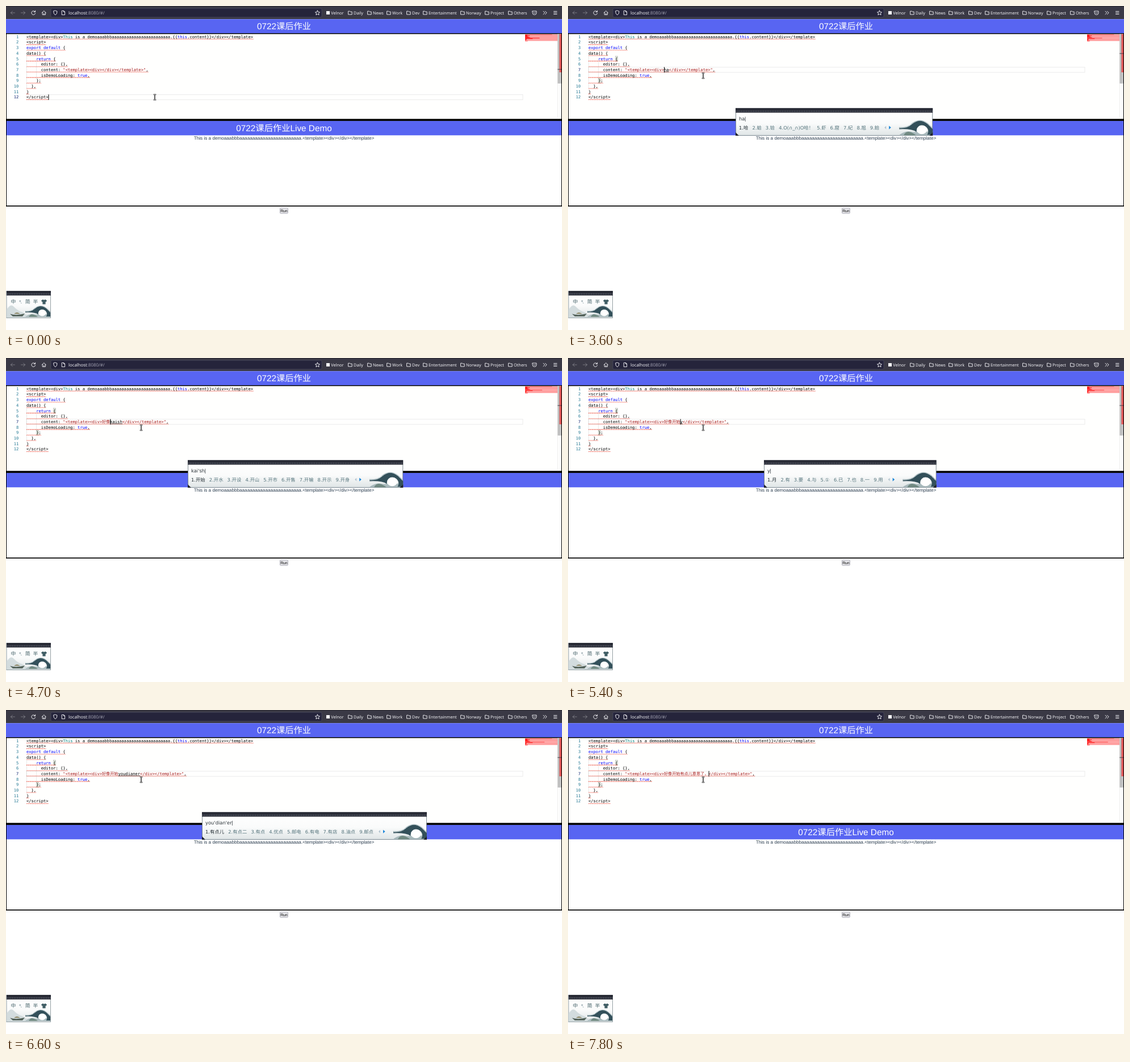
Write an HTML page that moves like this. It is 979x572 px and loops after 8000 ms.

```html
<!DOCTYPE html>
<html lang="zh-CN">
<head>
<meta charset="utf-8">
<title>Live Demo</title>
<style>
html, body { margin: 0; width: 100%; height: 100%; overflow: hidden; background: #fff; }
svg { display: block; width: 979px; height: 572px; }
text { white-space: pre; text-rendering: geometricPrecision; }
.code { font: 7.139px "DejaVu Sans Mono", "Noto Sans CJK SC", monospace; }
.ui { font: 7.4px "Open Sans", "Noto Sans", sans-serif; fill: #fbfbfe; }
.page { font-family: "Liberation Sans", "Noto Sans CJK SC", sans-serif; text-anchor: middle; }
.ime { font: 8.4px "DejaVu Sans", "Noto Sans CJK SC", sans-serif; fill: #55747c; }
.icon { fill: none; stroke: #fbfbfe; stroke-width: .9; stroke-linejoin: round; stroke-linecap: round; }
.k { fill: #00f; } .s { fill: #a31515; } .t { fill: #008080; }
</style>
</head>
<body>
<svg id="stage" viewBox="0 0 979 572" xmlns="http://www.w3.org/2000/svg">
  <defs>
    <pattern id="wave" width="6" height="3" patternUnits="userSpaceOnUse" patternTransform="translate(36 0) scale(.5099)">
      <path fill="#e51400" d="M5.5 0L2.5 3H1.1L4.1 0ZM4 0L6 2V.6L5.4 0ZM0 2L1 3H2.4L0 .6Z"/>
    </pattern>
    <pattern id="tiles" width="3" height="8" patternUnits="userSpaceOnUse">
      <rect width="3" height="8" fill="#20222c"/>
      <path d="M0 2.2H3" stroke="#454955" stroke-width=".6"/>
      <circle cx="1.5" cy="5.6" r="1" fill="#747b88"/>
    </pattern>
    <linearGradient id="mist" x2="0" y2="1">
      <stop offset="0" stop-color="#fff"/><stop offset=".55" stop-color="#fafbfb"/><stop offset="1" stop-color="#dfe5e6"/>
    </linearGradient>
    <symbol id="bridge" viewBox="0 0 60 26" overflow="visible">
      <path d="M2 24Q12 17 24 20L60 19V26H0Z" fill="#a9babd"/>
      <path d="M0 13Q15 14 23 6Q37 -6 51 6L60 15V25H50A10.5 10.5 0 1 0 31 20Q23 14 0 15Z" fill="#33505a"/>
      <path d="M0 12Q15 13 23 5Q37 -6 51 5L60 14" fill="none" stroke="#78949b" stroke-width="1.6" stroke-dasharray="1 1"/>
      <ellipse cx="40.5" cy="16" rx="9" ry="8" fill="#fff"/>
      <path d="M8 26Q12 18 19 20T30 26Z" fill="#718a82"/>
    </symbol>
  </defs>
  <g id="chrome"></g>
  <g id="page"></g>
  <g id="editor"></g>
  <g id="bar"></g>
  <g id="popup"></g>
  <g id="mouse">
    <path d="M-2.3 -4.6H2.3M0 -4.6V4.6M-2.3 4.6H2.3" fill="none" stroke="#222" stroke-width="1.9"/>
    <path d="M-1.9 -4.6H1.9M0 -4.6V4.6M-1.9 4.6H1.9" fill="none" stroke="#ddd" stroke-width=".6"/>
  </g>
</svg>
<script>
const LOOP = 8000, X0 = 36, TOP = 49.6, LH = 9.688, CH = 4.298, EM = 7.139;
const $ = id => document.getElementById(id);
const esc = s => s.replace(/&/g, '&amp;').replace(/</g, '&lt;');
const rect = (x, y, w, h, fill, more = '') => `<rect x="${x}" y="${y}" width="${w}" height="${h}" fill="${fill}" ${more}/>`;
const text = (x, y, s, cls, more = '') => `<text x="${x}" y="${y}" class="${cls}" ${more}>${s}</text>`;
const icon = (d, more = '') => `<path class="icon" d="${d}" ${more}/>`;
const lineTop = i => TOP + (i - 1) * LH;

// Browser toolbar
const marks = [['Daily', 603], ['News', 637], ['Work', 671], ['Dev', 706], ['Entertainment', 735],
  ['Norway', 801], ['Project', 844], ['Others', 885]];
const folder = x => icon(`M${x} 9.2H${x + 2.4}L${x + 3.3} 10.2H${x + 6.2}V15H${x}Z`);
$('chrome').innerHTML =
  rect(0, 0, 979, 23, '#3a3945') + rect(0, 0, 979, 1, '#25242d') +
  rect(79, 4.2, 477, 15.6, '#25243b', 'rx="2" stroke="#53526a" stroke-width=".6"') +
  icon('M15.5 12H8.5M11.5 9L8.5 12L11.5 15', 'opacity=".35"') +
  icon('M26.5 12H33.5M30.5 9L33.5 12L30.5 15', 'opacity=".35"') +
  icon('M51 10A3.4 3.4 0 1 0 51.6 13M51.6 8.2V10.6H49.2') +
  icon('M63.2 12L66.8 8.6L70.4 12M64.2 11.4V15.4H69.4V11.4M66.8 15V13') +
  icon('M86.8 8.2L90 9.3Q90.2 14 86.8 16Q83.4 14 83.6 9.3Z') +
  icon('M98.6 8.4H101.8L103.6 10.2V15.6H98.6ZM101.6 8.6V10.4H103.4') +
  text(110, 14.7, 'localhost<tspan fill="#a5a4b4">:8080/#/</tspan>', 'ui', 'style="font-size:7.85px"') +
  icon('M548.5 8L549.7 10.7L552.6 11L550.4 12.9L551.1 15.8L548.5 14.3L545.9 15.8L546.6 12.9L544.4 11L547.3 10.7Z') +
  rect(564, 9, 6, 6, '#fbfbfe') + text(572.3, 14.6, 'Velnor', 'ui') +
  marks.map(([s, x]) => folder(x) + text(x + 9, 14.6, s, 'ui')).join('') +
  icon('M927 9H934V12A3.5 3.5 0 0 1 927 12ZM928.8 11.4L930.5 13L932.2 11.4') +
  icon('M946 9.2L948.8 12L946 14.8M949.4 9.2L952.2 12L949.4 14.8') +
  icon('M964.5 9.5H970M964.5 12H970M964.5 14.5H970');

// Page
const title = (y, s) => rect(0, y - 18, 979, 25.3, '#5865f2') + text(489.5, y, s, 'page', 'font-size="15.3" fill="#fff"');
$('page').innerHTML =
  title(41.2, '0722课后作业') + title(221, '0722课后作业Live Demo') +
  rect(0, 48, 979, 153, '#000') + rect(1, 49.5, 977, 149.8, '#fffffe') +
  rect(0, 200.5, 979, 2.4, '#000') +
  rect(0, 201, 1, 153, '#000') + rect(978, 201, 1, 153, '#000') + rect(0, 352.3, 979, 1.7, '#000') +
  text(489.5, 235.8, 'This is a demoaaabbb' + 'a'.repeat(24) + '.' + esc('<template><div></div></template>'),
    'page', 'font-size="8.16" fill="#2c3e50"') +
  rect(482.4, 356.6, 14, 9.6, '#e9e9ed', 'rx="1.6" stroke="#8f8f9d" stroke-width=".7"') +
  text(489.4, 363.9, 'Run', 'page', 'font-size="6.8" fill="#000"');

// Editor: '' marks plain text, otherwise a colour class
const lines = [
  [['', '<template><div>'], ['t', 'This'], ['', ' is a demoaaabbb' + 'a'.repeat(24) + '.{{'], ['k', 'this'], ['', '.content}}</div></template>']],
  [['', '<script>']],
  [['k', 'export'], ['', ' '], ['k', 'default'], ['', ' {']],
  [['', 'data() {']],
  [['', '    '], ['k', 'return'], ['', ' {']],
  [['', '      editor: {},']],
  [['', '      content: '], ['s', '"<template><div>'], ['s', '', 'done'], ['', '', 'comp'], ['s', '</div></template>"'], ['', ',']],
  [['', '      isDemoLoading: '], ['k', 'true'], ['', ',']],
  [['', '    };']],
  [['', '  },']],
  [['', '}']],
  [['', '<\/script>']]
];
const size = lines.map(l => l.reduce((n, p) => n + p[1].length, 0));
const span = ([c, s, id]) => `<tspan class="${c}"${id ? ` id="${id}"` : ''}>${esc(s)}</tspan>`;
const guide = (x, a, b) => rect(x, lineTop(a), .5, (b - a + 1) * LH, '#d3d3d3');
const brace = (i, col) => rect(X0 + col * CH, lineTop(i) + .3, CH, LH - .6, '#e3ebe0', 'stroke="#b0b0b0" stroke-width=".5"');
const mini = i => 50 + (i - 1) * 1.02;

$('editor').innerHTML =
  `<g id="current">${rect(X0, .3, 874, LH - .6, 'none', 'stroke="#e6e6e6" stroke-width=".8"')}</g>` +
  guide(X0, 5, 10) + guide(53.2, 6, 8) +
  `<g id="braces">${brace(5, 11) + brace(9, 4)}</g>` +
  lines.map((l, i) => {
    const y = lineTop(i + 1);
    return text(22.3, y + 7.2, i + 1, 'code', `text-anchor="end" id="no${i + 1}"`) +
      `<g transform="translate(0 ${y + 8.1})">${rect(X0, 0, size[i] * CH, 1.53, 'url(#wave)', `id="err${i + 1}"`)}</g>` +
      text(X0, y + 7.2, l.map(span).join(''), 'code');
  }).join('') +
  rect(0, 0, 0, .6, '#000', 'id="under"') + rect(0, 0, 1, LH, '#000', 'id="caret"') +
  rect(914, 50, 57, 11.8, '#ff9f9f') +
  size.map((n, i) => rect(914, mini(i + 1), n * .51, 1.02, i ? '#ff1a1a' : '#ff5c5c', `id="mini${i + 1}"`)).join('') +
  rect(914, 0, 57, .7, '#ffd0d0', 'id="miniRow" opacity=".55"') +
  rect(971, 49.5, .5, 149.8, '#dcdcdc') + rect(971.2, 49.5, 6.8, 87.3, '#c1c1c1') +
  rect(974.4, 49.5, 3.6, 67.6, '#dc5656') + rect(971.2, 0, 6.8, 1, '#4a3a44', 'id="rulerMark"');

// Input method status bar
$('bar').innerHTML =
  rect(1, 503.3, 77.5, 47.4, 'url(#mist)', 'stroke="#7d8a8f" stroke-width=".8"') +
  '<path d="M1.4 536Q8 524 14 531T30 541L40 550H1.4Z" fill="#d3dcde"/>' +
  '<use href="#bridge" x="34" y="529" width="44" height="21"/>' +
  '<path d="M7 543.5Q18 547 33 543L29 548H12Z" fill="#55645c"/><path d="M14 543.5Q19 538.5 25 543.5Z" fill="#8b8564"/>' +
  '<g transform="translate(1 503)">' + rect(0, 0, 78, 8, 'url(#tiles)') + '</g>' +
  ['中', '简', '半'].map((c, i) => text([8.6, 33.8, 47.6][i], 525.4, c, 'ime', 'style="font-size:8.8px;fill:#3f5d64"')).join('') +
  '<circle cx="24.8" cy="521" r="1.1" fill="none" stroke="#6b858b" stroke-width=".7"/><path d="M26.3 523.8L27.4 525" stroke="#6b858b"/>' +
  '<path d="M62 520L65 518Q67 520 69 518L72 520L70.6 522.6L69.6 522V526.5H64.4V522L63.4 522.6Z" fill="#3f5d64"/>';

// Typing: time, accepted text, letters being composed, candidates
const steps = [
  [0, '', '', ''],
  [3000, '', 'h', ''],
  [3100, '', 'h', '和 好 会 很 还 后 或 号 哈'],
  [3600, '', 'ha', '哈 蛤 铪 O(∩_∩)O哈！ 虾 窟 紀 㞁 鉿'],
  [3800, '', 'hao', '好 号 浩 豪 毫 耗 昊 皓 郝'],
  [4200, '好像', '', ''],
  [4300, '好像', 'k', '看 可 快 开 靠 块 口 卡 框'],
  [4400, '好像', 'ka', '卡 咖 喀 咔 佧 胩 咯 擖 鉲'],
  [4500, '好像', 'kai', '开 凯 慨 楷 揩 铠 恺 锴 蒈'],
  [4600, '好像', "kai's", '开始 开水 开赛 开锁 开设 开山 开伞 开司 开诉'],
  [4700, '好像', "kai'sh", '开始 开水 开设 开山 开市 开售 开输 开示 开身'],
  [4800, '好像', "kai'shi", '开始 开市 开示 开释 开试 凯诗 开食 开室 楷式'],
  [4900, '好像开始', '', ''],
  [5400, '好像开始', 'y', '月 有 要 与 ① 已 也 一 用'],
  [5500, '好像开始', 'yo', '有 用 又 由 哟 永 油 友 右'],
  [5600, '好像开始', 'you', '有 又 由 油 友 右 游 优 幼'],
  [5800, '好像开始', "you'd", '有的 有点 有多 有道 优点 有待 游荡 有得 诱导'],
  [5900, '好像开始', "you'di", '有的 有地 有敌 邮递 有底 有弟 有第 油滴 优地'],
  [6100, '好像开始', "you'dia", '有点 优点 邮电 有电 有店 油点 邮点 油电 幼点'],
  [6300, '好像开始', "you'dian", '有点 优点 邮电 有电 有店 油点 邮点 油电 幼点'],
  [6500, '好像开始', "you'dian'e", '有点儿 有点饿 有点 优点 邮电 有电 有店 油点 邮点'],
  [6600, '好像开始', "you'dian'er", '有点儿 有点二 有点 优点 邮电 有电 有店 油点 邮点'],
  [6800, '好像开始有点儿', '', ''],
  [7000, '好像开始有点儿', 'y', '月 有 要 与 ① 已 也 一 用'],
  [7100, '好像开始有点儿', 'yi', '一 以 已 意 议 易 亿 衣 艺'],
  [7200, '好像开始有点儿', "yi's", '意思 一审 一生 一时 医生 遗失 意识 一手 艺术'],
  [7300, '好像开始有点儿', "yi'si", '意思 一丝 疑似 医死 一死 遗思 已死 义思 衣丝'],
  [7400, '好像开始有点儿', "yi'si'le", '意思了 已死了 疑似 意思 一丝 一死 已死 遗思 衣丝'],
  [7500, '好像开始有点儿意思了', '', ''],
  [7800, '好像开始有点儿意思了，', '', '']
];
const path = [[0, 262, 161], [100, 262, 161], [200, 248, 148], [300, 216, 128], [400, 199, 118], [500, 199, 118],
  [600, 195, 117], [900, 181, 111], [1400, 170, 112], [1600, 170, 112], [1700, 184, 114], [1900, 226, 121], [2000, 238, 123]];
const blink = [[0, 1], [300, 0], [800, 1], [1300, 0], [1600, 1], [2100, 0], [2700, 1], [6100, 0], [6800, 1]];
const last = (table, t) => table.filter(r => r[0] <= t).pop();

function mouseAt(t) {
  const i = path.findIndex(p => p[0] > t);
  if (i < 0) return path[path.length - 1].slice(1);
  const [a, ax, ay] = path[i - 1], [b, bx, by] = path[i], k = (t - a) / (b - a);
  return [ax + (bx - ax) * k, ay + (by - ay) * k];
}

const itemWidth = s => [...s].reduce((w, c) => w + (/[O()∩_]/.test(c) ? 5.03 : 8.4), 15);

function popup(x, letters, list) {
  let cx = x + 6, items = '';
  list.split(' ').forEach((s, i) => {
    items += text(cx, 217.6, `${i + 1}.${s}`, 'ime', i ? '' : 'style="fill:#1f2a30"');
    cx += itemWidth(s);
  });
  const w = cx + 87 - x, r = x + w;
  return rect(x + .4, 181, w - .8, 47.6, 'url(#mist)', 'stroke="#66757c" stroke-width=".8"') +
    `<use href="#bridge" x="${r - 59}" y="202.5" width="59" height="26"/>` +
    `<g transform="translate(${x} 180.3)">${rect(0, 0, w, 8, 'url(#tiles)')}</g>` +
    `<path d="M${x} 223V229H${x + 6}L${x + 3} 226ZM${r} 223V229H${r - 6}L${r - 3} 226Z" fill="#20222c"/>` +
    text(x + 6, 202.2, letters + '<tspan dx="-.6">|</tspan>', 'ime', 'style="fill:#2b3338"') + items +
    `<path d="M${cx + 5} 211.8V217.4L${cx + 2} 214.6Z" fill="#b4c4cf"/>` +
    `<path d="M${cx + 10} 211.4V217.8L${cx + 13.6} 214.6Z" fill="#1c86d8"/>`;
}

const set = (id, name, v) => $(id).setAttribute(name, v);
let shown = null;

function type(step) {
  const [, done, letters, list] = step, comp = letters.replace(/'/g, '');
  $('done').textContent = done;
  $('comp').textContent = comp;
  const start = X0 + 31 * CH + done.length * EM, wide = comp.length * CH;
  set('err7', 'width', size[6] * CH + done.length * EM + wide);
  set('mini7', 'width', (size[6] + done.length * 2 + comp.length) * .51);
  set('under', 'x', start);
  set('under', 'y', lineTop(7) + 8.1);
  set('under', 'width', wide);
  $('popup').innerHTML = list ? popup(295 + 12.5 * done.length, letters, list) : '';
  shown = step;
}

function render(ms) {
  const t = Math.floor(ms / 100) * 100, step = last(steps, t), row = t < 1600 ? 12 : 7;
  if (step !== shown) type(step);
  set('current', 'transform', `translate(0 ${lineTop(row)})`);
  set('miniRow', 'y', mini(row));
  set('rulerMark', 'y', 49.8 + (row - 1) * 5.6);
  set('braces', 'opacity', t >= 1700 ? 1 : 0);
  for (let i = 1; i <= 12; i++) set('no' + i, 'fill', i === row ? '#0b216f' : '#237893');
  set('caret', 'x', row === 12 ? X0 + 9 * CH - .2 : X0 + 31 * CH + step[1].length * EM - .2);
  set('caret', 'y', lineTop(row));
  set('caret', 'opacity', last(blink, t)[1]);
  set('mouse', 'transform', `translate(${mouseAt(t)})`);
}

const begin = performance.now();
function frame() {
  render((performance.now() - begin) % LOOP);
  requestAnimationFrame(frame);
}
frame();
</script>
</body>
</html>
```
